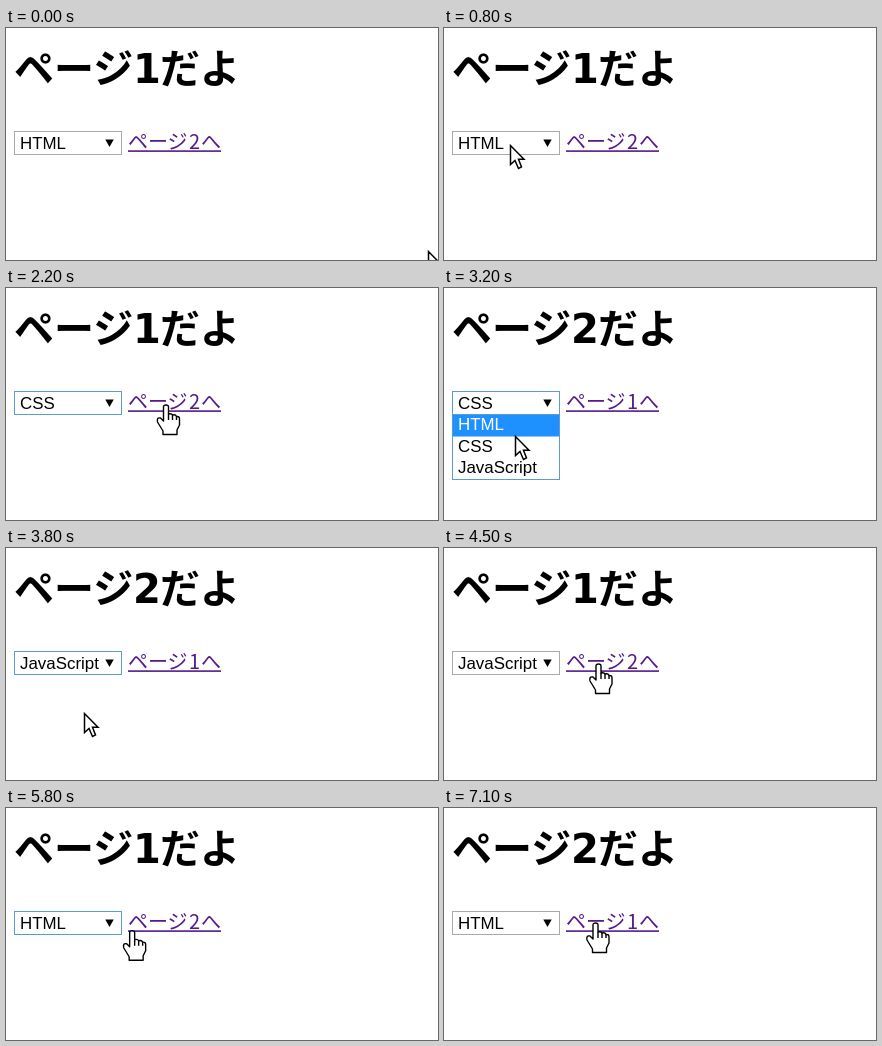
These frames come from a looping animation (432x232 px, 7200 ms). An HTML page:

```html
<!DOCTYPE html>
<html lang="ja">
<head>
<meta charset="utf-8">
<style>
  html, body { margin: 0; width: 432px; height: 232px; overflow: hidden; background: #fff; }
  svg { display: block; }
  .ja { font-family: "Noto Sans CJK JP", "Noto Sans CJK", sans-serif; }
  .title { font-size: 40px; font-weight: 700; }
  .title .digit { font-family: "DejaVu Sans", sans-serif; }
  .link { font-size: 20px; font-weight: 300; fill: #551a8b; }
  .digit { text-anchor: middle; }
  .ui { font: 16.9px "Liberation Sans", Arial, sans-serif; }
</style>
</head>
<body>
<svg width="432" height="232" viewBox="0 0 432 232">
  <g class="ja title">
    <text x="8" y="55">ページ</text>
    <text class="digit" id="titleDigit" x="141" y="55"></text>
    <text x="154" y="55">だよ</text>
  </g>
  <g class="ja link">
    <text x="122" y="120.5">ページ</text>
    <text class="digit" id="linkDigit" x="188.5" y="120.5"></text>
    <text x="195" y="120.5">へ</text>
    <rect x="122" y="122.3" width="93" height="1.6"/>
  </g>
  <g class="ui">
    <rect id="box" x="8.5" y="103.5" width="107" height="23" fill="#fff"/>
    <text id="value" x="14" y="121"></text>
    <path d="M99.3 111.5H107.7L103.5 119Z"/>
    <g id="menu">
      <rect x="8.5" y="126.5" width="107" height="65" fill="#fff" stroke="#5b9ad8"/>
    </g>
  </g>
  <g id="arrow" fill="#fff" stroke="#000" stroke-width="1.5">
    <path d="M.5 .5V19.5L5 15.5L8.5 23.5L11.5 22L8.5 14.3H14Z"/>
  </g>
  <g id="hand" fill="#fff" stroke="#000" stroke-width="1.4" stroke-linejoin="round">
    <path d="M-3 2Q-3 0-.5 0T2 2V9Q5 8 6 10Q9 9 10 11.5Q13 11 13 14V20L10.5 25V29.5H-3.5V26L-9 17Q-10 12-6 13L-3 16Z"/>
    <path d="M2 9V15M6 10V15M10 11.5V15" fill="none"/>
  </g>
</svg>
<script>
const LOOP = 7200, STEP = 100;
const OPTIONS = ["HTML", "CSS", "JavaScript"];
const ROW_TOP = 127, ROW_HEIGHT = 21.5;
const $ = id => document.getElementById(id);

// Pointer waypoints: time, x, y
const route = [
  [0, 422, 223], [800, 66, 117], [1000, 66, 118], [1400, 67, 153], [1600, 68, 156],
  [1700, 72, 154], [2200, 160.5, 117], [2400, 159, 116], [2500, 159, 116],
  [2800, 72, 126], [3000, 72, 126], [3200, 71, 148], [3600, 78, 179],
  [3700, 78, 179], [3800, 78, 165], [4300, 155, 116], [4500, 155, 116],
  [4800, 88, 119], [5000, 88, 120], [5300, 80, 137], [5500, 80, 137],
  [6000, 152, 115]
];
// Interface state from each time on: page, value, focused, open, highlighted row
const states = [
  [0, 1, 0, 0, 0], [900, 1, 0, 1, 1], [1700, 1, 1, 1, 0], [2500, 2, 1, 0, 0],
  [3000, 2, 1, 1, 1], [3800, 2, 2, 1, 0], [4500, 1, 2, 0, 0],
  [4900, 1, 2, 1, 1], [5500, 1, 0, 1, 0], [6200, 2, 0, 0, 0]
];

const rows = OPTIONS.map((name, i) => {
  const add = (tag, attrs) => {
    const el = document.createElementNS("http://www.w3.org/2000/svg", tag);
    for (const key in attrs) el.setAttribute(key, attrs[key]);
    return $("menu").appendChild(el);
  };
  const top = ROW_TOP + i * ROW_HEIGHT;
  const bar = add("rect", { x: 9, y: top, width: 106, height: ROW_HEIGHT, fill: "#1e90ff" });
  const label = add("text", { x: 14, y: top + 15 });
  label.textContent = name;
  return { bar, label };
});

const smooth = u => u * u * (3 - 2 * u);

function pointerAt(t) {
  const next = route.findIndex(p => p[0] > t);
  if (next < 0) return route[route.length - 1].slice(1);
  const [t0, x0, y0] = route[next - 1], [t1, x1, y1] = route[next];
  const k = smooth((t - t0) / (t1 - t0));
  return [x0 + (x1 - x0) * k, y0 + (y1 - y0) * k];
}

function show(el, visible) {
  el.setAttribute("visibility", visible ? "visible" : "hidden");
}

function render(time) {
  const t = Math.floor(time % LOOP / STEP) * STEP;
  const [, page, value, focused, open] = states.filter(s => s[0] <= t).pop();
  const [x, y] = pointerAt(t);

  $("titleDigit").textContent = page;
  $("linkDigit").textContent = 3 - page;
  $("value").textContent = OPTIONS[value];
  $("box").setAttribute("stroke", focused ? "#5b9ad8" : "#a9a9a9");

  // The chosen option stays marked until the pointer enters the list.
  const hovered = y < ROW_TOP ? value : Math.min(2, Math.floor((y - ROW_TOP) / ROW_HEIGHT));
  $("menu").style.display = open ? "" : "none";
  rows.forEach(({ bar, label }, i) => {
    bar.setAttribute("fill-opacity", i === hovered ? 1 : 0);
    label.setAttribute("fill", i === hovered ? "#fff" : "#000");
  });

  const overLink = !open && x >= 122 && x <= 215 && y >= 101 && y <= 125;
  show($("hand"), overLink);
  show($("arrow"), !overLink);
  $(overLink ? "hand" : "arrow").setAttribute("transform", `translate(${x} ${y})`);
}

const start = performance.now();
function tick() {
  render(performance.now() - start);
  requestAnimationFrame(tick);
}
tick();
</script>
</body>
</html>
```
